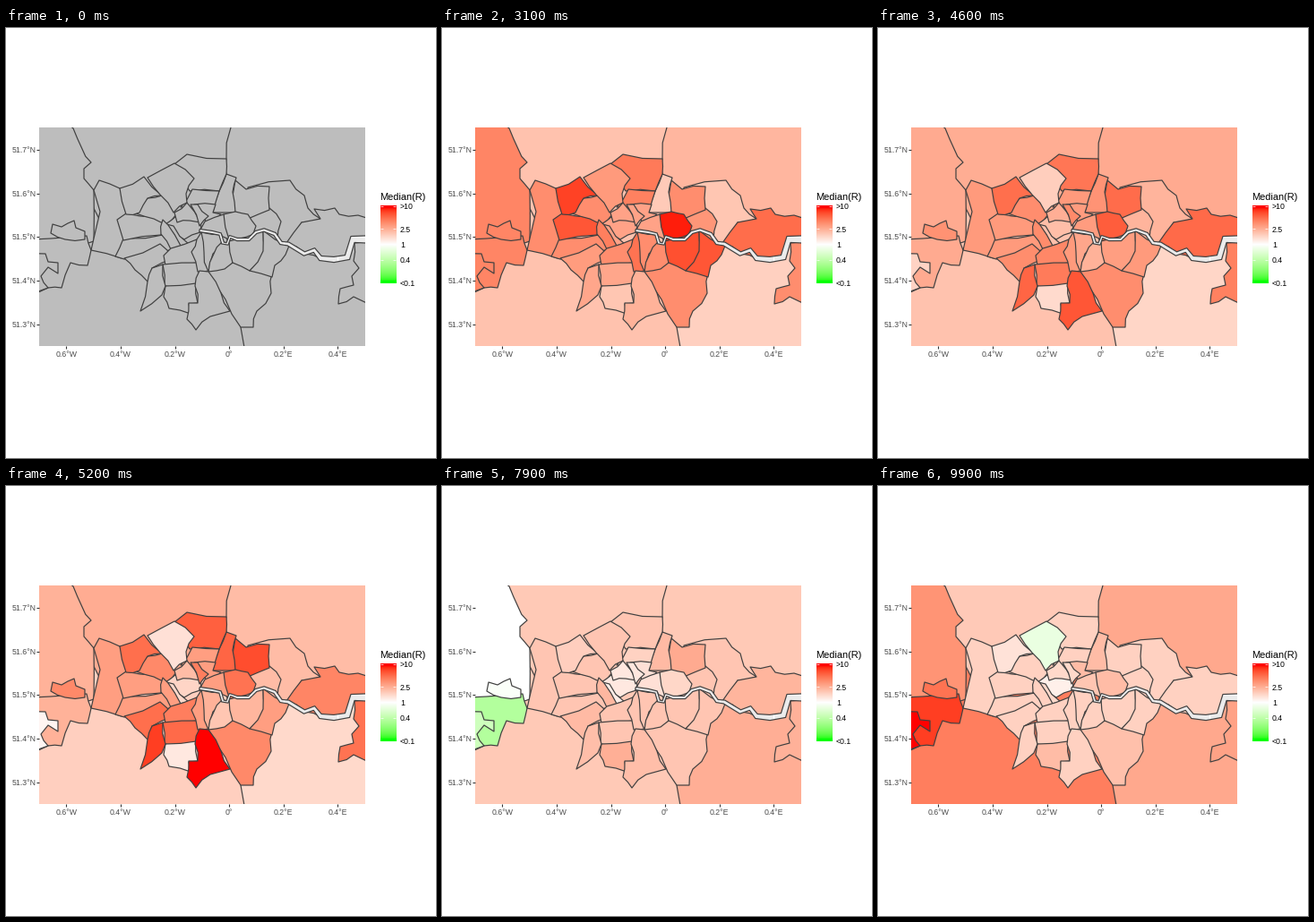
Recreate the animation shown at these times as a matplotlib script. Size 480x480 px, loop 10000 ms.

```python
import numpy as np
import matplotlib.pyplot as plt
from matplotlib.animation import FuncAnimation
from matplotlib.collections import PolyCollection
from matplotlib.patches import Polygon, Rectangle

SIZE, DPI = 480, 100
PX = 72 / DPI                      # one pixel in points
LEFT, RIGHT, TOP, BOTTOM = 37, 401, 111, 355
INK = "#404040"
FRAMES, START = 100, 27
KEYS = [27, 37, 52, 67, 87, 99]    # frames at which levels are given

# Typical course of the level in each zone
OUTER = (.25, .42, .35, .29, .28, .45)
INNER = (.6, .55, .5, .41, .23, .24)
CENTRE = (.45, .52, .35, .25, .1, .2)
WEST = (.7, .5, .4, .15, -.1, .55)

WHITE = np.array([100, 0, 0])
RED = np.array([53.24, 80.09, 67.20])
GREEN = np.array([87.73, -86.18, 83.18])
GREY = np.array([76.6, 0, 0])


def level_lab(v):
    """Levels from -1 (green) over 0 (white) to 1 (red), as Lab."""
    v = np.clip(np.asarray(v, float), -1, 1)[:, None]
    return WHITE + np.abs(v) * (np.where(v < 0, GREEN, RED) - WHITE)


def lab_rgb(lab):
    fy = (lab[:, 0] + 16) / 116
    f = np.stack([fy + lab[:, 1] / 500, fy, fy - lab[:, 2] / 200], axis=1)
    xyz = np.where(f > 6 / 29, f ** 3, (f - 4 / 29) * 3 * (6 / 29) ** 2)
    xyz = xyz * [0.9505, 1, 1.089]
    m = np.array([[3.2406, -1.5372, -0.4986],
                  [-0.9689, 1.8758, 0.0415],
                  [0.0557, -0.2040, 1.0570]])
    lin = np.clip(xyz @ m.T, 0, 1)
    return np.where(lin <= 0.0031308, 12.92 * lin,
                    1.055 * lin ** (1 / 2.4) - 0.055)


rng = np.random.default_rng(4)


def rough(points):
    """Break each long side at a slightly displaced midpoint."""
    out = []
    for a, b in zip(points, np.roll(points, -1, axis=0)):
        out.append(a)
        d = b - a
        length = np.hypot(*d)
        if length > 14:
            shift = rng.uniform(-1, 1) * min(2.5, 0.1 * length)
            out.append((a + b) / 2 + shift * np.array([-d[1], d[0]]) / length)
    return np.array(out)


shapes, levels = [], []


def area(zone, *corners, **peaks):
    """Add an area; peaks such as k2=.8 override the zone's level at a key."""
    shapes.append(rough(np.array(corners, float)))
    levels.append([peaks.get(f"k{i}", v) for i, v in enumerate(zone)])


# Later areas cover the hidden sides of earlier ones.
# Surroundings
area(OUTER, (25, 100), (415, 100), (415, 365), (25, 365), k2=.25, k5=.65)
area(OUTER, (50, 100), (300, 100), (290, 215), (105, 215), k2=.43, k5=.28)
area(WEST, (25, 100), (66, 105), (75, 112), (85, 135), (95, 150), (87, 157),
     (87, 168), (98, 181), (98, 238), (85, 244), (25, 244))
area(OUTER, (251, 100), (251, 111), (246, 146), (246, 163), (260, 200),
     (415, 230), (415, 100), k1=.57)
area(OUTER, (300, 245), (415, 238), (415, 362), (267, 362), (262, 334),
     (285, 270), k1=.24, k2=.2, k3=.45, k4=.4)
area(INNER, (415, 236), (389, 240), (388, 260), (394, 268), (386, 277),
     (388, 287), (373, 291), (371, 308), (388, 300), (415, 312),
     k2=.7, k4=.4, k5=.48)
area(WEST, (25, 232), (50, 235), (90, 232), (95, 248), (91, 265), (72, 262),
     (62, 290), (47, 290), (25, 297), k3=.05, k4=-.85, k5=.9)
area(WEST, (50, 229), (52, 219), (62, 222), (76, 215), (78, 223), (88, 227),
     (88, 236), (66, 236), k2=.6, k3=.3, k4=-.25, k5=.7)
area(WEST, (25, 248), (44, 252), (47, 261), (58, 262), (58, 274), (47, 267),
     (39, 277), (47, 290), (25, 297), k2=.05, k3=-.55, k4=-.18, k5=1)

# East
area(INNER, (270, 178), (317, 170), (333, 187), (337, 201), (351, 213),
     (330, 217), (314, 243), (270, 235), k0=.2, k1=.45, k2=.35)
area(INNER, (313, 240), (330, 217), (351, 213), (344, 202), (367, 201),
     (372, 208), (393, 209), (415, 217), (415, 236), (387, 236), (380, 258),
     (352, 258), (334, 252), k1=.92, k2=.62, k3=.62)
area(INNER, (270, 213), (294, 201), (307, 216), (303, 238), (275, 230),
     k1=.45, k2=.35)
area(INNER, (256, 170), (268, 180), (294, 177), (294, 203), (270, 213),
     (254, 206), k2=.85, k3=.75)
area(INNER, (246, 163), (257, 167), (253, 183), (256, 206), (231, 206),
     (238, 182), k0=.3, k1=.24, k2=.76, k3=.55, k5=.35)
area(CENTRE, (243, 208), (256, 205), (270, 208), (279, 221), (270, 237),
     (247, 237), k0=1, k1=.93, k2=.7, k3=.38, k5=.35)

# West
area(INNER, (98, 181), (104, 170), (127, 179), (140, 206), (140, 255),
     (129, 257), (95, 248), (105, 205))
area(INNER, (122, 255), (131, 235), (180, 230), (186, 247), (153, 252),
     (132, 258))
area(INNER, (124, 214), (134, 207), (165, 211), (176, 214), (173, 231),
     (131, 237), k0=1)
area(INNER, (145, 207), (158, 190), (174, 187), (190, 208), (180, 219),
     (165, 213), k2=.6)
area(INNER, (127, 179), (154, 166), (174, 187), (158, 190), (149, 206),
     (134, 208), k0=1, k1=.72, k2=.72, k4=.15, k5=.15)

# North
area(INNER, (188, 152), (202, 141), (246, 146), (246, 163), (238, 182),
     (205, 182), k0=.75, k2=.78)
area(INNER, (195, 200), (208, 180), (238, 182), (233, 198), (206, 200),
     k0=.7, k4=.12)
area(INNER, (158, 167), (188, 151), (210, 168), (201, 185), (202, 195),
     (187, 206), (172, 186), k1=.4, k2=.16, k5=-.15)

# Centre
area(CENTRE, (178, 219), (190, 210), (216, 213), (217, 228), (199, 236),
     k2=.22, k3=.15, k5=.08)
area(CENTRE, (188, 206), (202, 195), (217, 217), (205, 215), (191, 217),
     k4=.04)
area(CENTRE, (210, 197), (234, 197), (231, 206), (240, 208), (225, 220),
     k2=.5, k5=.35)
area(CENTRE, (206, 197), (214, 197), (226, 210), (216, 221), k2=.65, k4=.04)
area(CENTRE, (222, 216), (243, 208), (249, 236), (238, 231), (216, 227),
     k2=.5, k5=.3)
area(CENTRE, (179, 219), (187, 221), (204, 241), (194, 243), k2=.2, k3=.08)
area(INNER, (175, 214), (181, 220), (195, 243), (184, 247), (173, 230),
     k1=.72, k4=.35)

# South
area(INNER, (132, 257), (172, 241), (180, 248), (186, 258), (163, 268),
     (158, 283), (144, 270), k1=.38, k2=.72, k3=.55)
area(INNER, (176, 254), (184, 246), (213, 236), (214, 262), (186, 264),
     (178, 265), k2=.65)
area(INNER, (175, 264), (217, 262), (217, 285), (195, 290), (177, 288),
     k0=.4, k2=.74)
area(INNER, (213, 236), (218, 228), (230, 240), (228, 272), (214, 272),
     (207, 250), k0=.8)
area(INNER, (218, 228), (241, 231), (241, 239), (231, 252), (226, 272),
     (221, 250), k2=.4)
area(INNER, (220, 272), (253, 262), (298, 270), (296, 296), (280, 316),
     (276, 334), (262, 334), (245, 303), k2=.6, k5=.33)
area(INNER, (241, 239), (251, 240), (253, 262), (244, 269), (226, 272),
     (232, 252), k2=.3)
area(INNER, (249, 238), (287, 226), (290, 249), (272, 271), (253, 262),
     k0=.95, k1=.68, k2=.38)
area(INNER, (287, 226), (316, 243), (312, 253), (300, 265), (297, 278),
     (272, 271), (287, 249), k0=1)
area(INNER, (178, 288), (212, 285), (214, 307), (204, 308), (206, 319),
     (182, 313), (176, 300), k0=.3, k1=.3, k2=.12, k4=.42, k5=.35)
area(INNER, (216, 271), (226, 272), (240, 296), (250, 316), (228, 322),
     (212, 337), (202, 325), (204, 307), (214, 307), (211, 288),
     k0=.3, k2=1, k3=.5)
area(INNER, (175, 264), (178, 288), (174, 298), (150, 316), (158, 283),
     (163, 268), k0=.4, k2=.9, k3=.5)


def river_outline():
    """Banks on both sides of the stream, wider towards the sea."""
    mid = np.array([(216, 226), (230, 228), (239, 230), (242, 240), (247, 241),
                    (250, 233), (258, 236), (271, 236), (279, 228),
                    (288, 225.5), (300, 230), (307, 240), (315, 241),
                    (333, 252), (344, 248), (351, 257), (366, 258.5),
                    (381, 256), (387, 236), (415, 236)])
    way = np.gradient(mid, axis=0)
    normal = np.stack([-way[:, 1], way[:, 0]], axis=1)
    normal /= np.hypot(*way.T)[:, None]
    half = 1.6 + 3 * np.linspace(0, 1, len(mid))[:, None] ** 4
    return np.concatenate([mid - half * normal, (mid + half * normal)[::-1]])


fig = plt.figure(figsize=(SIZE / DPI, SIZE / DPI), dpi=DPI, facecolor="white")
ax = fig.add_axes([0, 0, 1, 1])
ax.axis("off")


def label(x, y, text, size=8.8, color="#4d4d4d", ha="left"):
    ax.text(x, y, text, fontsize=size * PX, color=color, ha=ha,
            va="baseline", family="Liberation Sans")


def line(xs, ys, color, width=1.1, **kw):
    return ax.plot(xs, ys, color=color, lw=width * PX,
                   solid_capstyle="butt", **kw)[0]


panel = Rectangle((LEFT, TOP), RIGHT - LEFT, BOTTOM - TOP, fc="none", ec="none")
ax.add_patch(panel)

land = PolyCollection(shapes, edgecolors=INK, linewidths=1.2 * PX, zorder=2)
ax.add_collection(land, autolim=False)
land.set_clip_path(panel)

river = river_outline()
water = Polygon(river, fc="#ebebeb", ec="none", zorder=3)
shore = Polygon(river, fc="none", ec=INK, lw=1.2 * PX, zorder=5)
for patch in (water, shore):
    ax.add_patch(patch)
    patch.set_clip_path(panel)

# Axes, with the grid showing only on the water
for i in range(5):
    y = 135.9 + 48.65 * i
    label(34, y + 3.2, f"51.{7 - i}°N", ha="right")
    line([34.3, LEFT], [y, y], "#333333")
    line([LEFT, RIGHT], [y, y], "white", 1.4, zorder=4).set_clip_path(water)
for i, text in enumerate(["0.6°W", "0.4°W", "0.2°W", "0°", "0.2°E", "0.4°E"]):
    x = 67.4 + 60.6 * i
    label(x, 367, text, ha="center")
    line([x, x], [BOTTOM, BOTTOM + 2.8], "#333333")
    line([x, x], [TOP, BOTTOM], "white", 1.4, zorder=4).set_clip_path(water)

# Colour bar
label(417, 192, "Median(R)", 11, "black")
ramp = lab_rgb(level_lab(np.linspace(1.05, -1.05, 87)))[:, None, :]
ax.imshow(ramp, extent=(417.5, 435, 285, 198), aspect="auto",
          interpolation="nearest", zorder=2)
for text, v in [(">10", 1), ("2.5", .398), ("1", 0), ("0.4", -.398), ("<0.1", -1)]:
    y = 241.5 - 43 * v
    label(440, y + 3.2, text, color="black")
    for x in (417.5, 431.5):
        line([x, x + 3.5], [y, y], "white", 0.7, zorder=3)
ax.set_xlim(0, SIZE)
ax.set_ylim(SIZE, 0)


def draw(i):
    v = [np.interp(i, KEYS, row) for row in levels]
    shown = np.clip(0.23 + 0.39 * (i - START), 0, 1) if i >= START else 0
    land.set_facecolor(lab_rgb(GREY + shown * (level_lab(v) - GREY)))
    return [land]


anim = FuncAnimation(fig, draw, frames=FRAMES, interval=100, repeat=True,
                     repeat_delay=0, init_func=lambda: draw(0))
plt.show()
```
